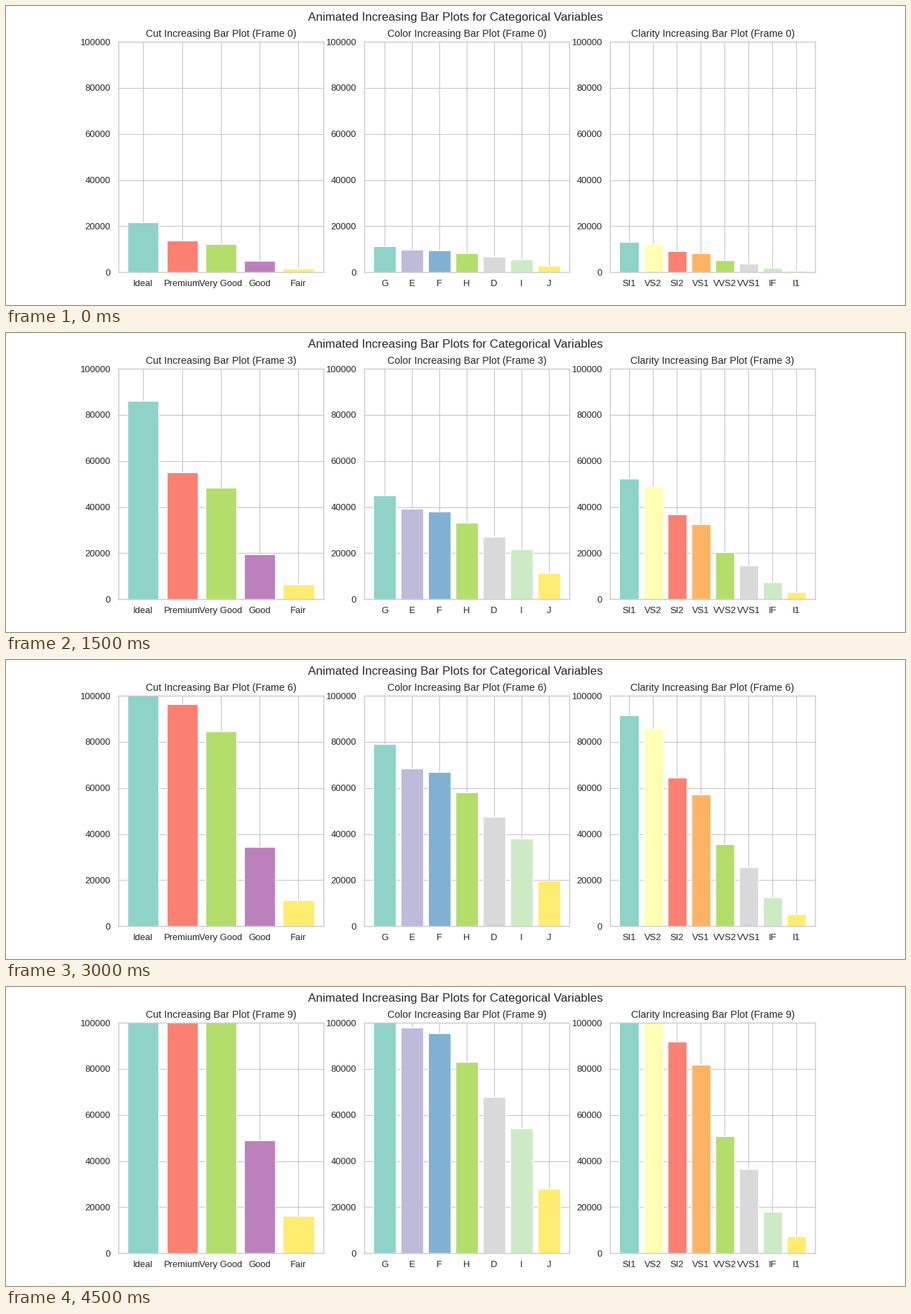
Recreate the animation shown at these times as a matplotlib script. Size 1280 by 427 pixels, loop 5 s.

```python
import numpy as np
import matplotlib.pyplot as plt
from matplotlib.animation import FuncAnimation

WIDTH, HEIGHT, DPI = 1280, 427, 256 / 3
FRAMES, INTERVAL = 10, 500

COUNTS = {
    "Cut": {"Ideal": 21551, "Premium": 13791, "Very Good": 12082,
            "Good": 4906, "Fair": 1610},
    "Color": {"G": 11292, "E": 9797, "F": 9542, "H": 8304,
              "D": 6775, "I": 5422, "J": 2808},
    "Clarity": {"SI1": 13065, "VS2": 12258, "SI2": 9194, "VS1": 8171,
                "VVS2": 5066, "VVS1": 3655, "IF": 1790, "I1": 741},
}

plt.rcParams.update({
    "font.family": "Liberation Sans",
    "font.size": 12,
    "text.color": "0.15",
    "axes.titlesize": 12,
    "axes.edgecolor": "0.8",
    "axes.linewidth": 1.25,
    "axes.axisbelow": True,
    "axes.grid": True,
    "grid.color": "0.75",
    "grid.linewidth": 0.8,
    "xtick.labelsize": 11,
    "ytick.labelsize": 11,
    "xtick.color": "0.15",
    "ytick.color": "0.15",
    "xtick.bottom": False,
    "ytick.left": False,
    "xtick.major.size": 6,
    "ytick.major.size": 6,
})

fig, axes = plt.subplots(1, 3, figsize=(WIDTH / DPI, HEIGHT / DPI), dpi=DPI)
fig.suptitle("Animated Increasing Bar Plots for Categorical Variables",
             fontsize=14.4)


def make_panel(ax, counts):
    colors = plt.cm.Set3(np.linspace(0, 1, len(counts)))
    bars = ax.bar(list(counts), list(counts.values()), color=colors,
                  edgecolor="white", linewidth=1)
    ax.set_ylim(0, 100000)
    return bars


panels = [(ax, name, counts, make_panel(ax, counts))
          for ax, (name, counts) in zip(axes, COUNTS.items())]


def update(frame):
    for ax, name, counts, bars in panels:
        for bar, count in zip(bars, counts.values()):
            bar.set_height(count * (frame + 1))
        ax.set_title(f"{name} Increasing Bar Plot (Frame {frame})")
    return []


anim = FuncAnimation(fig, update, frames=FRAMES, interval=INTERVAL,
                     repeat=True, repeat_delay=0, blit=False)
plt.show()
```
